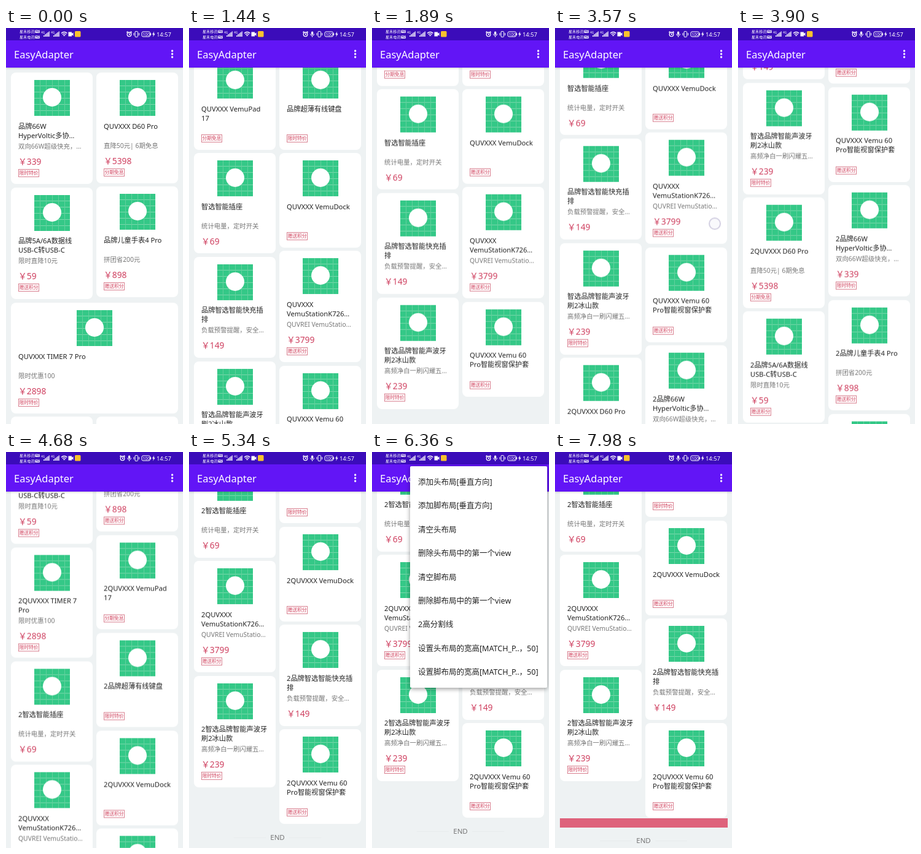
These frames come from a looping animation (288 by 640 pixels, 8000 ms). An HTML page:

```html
<!DOCTYPE html>
<html lang="zh">
<head>
<meta charset="utf-8">
<style>
html, body { margin: 0; width: 100%; height: 100%; overflow: hidden; }
body { font-family: "Noto Sans", "Noto Sans CJK SC", "Noto Sans CJK", sans-serif; }
div { position: absolute; box-sizing: border-box; white-space: pre; }
#stage { left: 0; top: 0; width: 288px; height: 640px; overflow: hidden; background: #eef2f3; }
#view { left: 0; top: 64px; width: 288px; height: 576px; overflow: hidden; }
#list { left: 0; top: -64px; width: 288px; height: 2600px; will-change: transform; }
#more { left: 0; top: 0; width: 288px; height: 2600px; }
.card { background: #fff; border-radius: 8px; }
.tile {
  top: 12px; left: calc(50% - 29px); width: 58px; height: 58px;
  background:
    repeating-linear-gradient(90deg, #0000 0 9px, #62d09d 9px 10px),
    repeating-linear-gradient(#0000 0 9px, #7bd9ad 9px 10px), #34c887;
}
.dot { left: 14px; top: 13px; width: 30px; height: 30px; border-radius: 50%; background: #fff; }
.title, .sub, .price { left: 12px; }
.title { font-size: 11.2px; line-height: 15px; color: #222; }
.sub { font-size: 10.4px; line-height: 15px; color: #777; }
.price { font-size: 13.8px; line-height: 20px; color: #cf3f5f; }
.tag {
  left: 12px; width: 34px; height: 13px; border: 1px solid #d98090;
  font-size: 7.8px; line-height: 11px; text-align: center; color: #d0405c;
}
#end { left: 0; top: 2467px; width: 288px; text-align: center; font-size: 11.5px; line-height: 18px; color: #777; }
#end i { position: absolute; top: 9px; width: 52px; height: 1px; background: #e8eced; }
#strip { left: 8px; top: 2455px; width: 273px; height: 15px; background: #de627b; }
#bar { left: 0; top: 20px; width: 288px; height: 44px; background: #6215f6; box-shadow: 0 1px 3px #0003; }
#name { left: 13px; top: 11px; font-size: 16.5px; line-height: 24px; color: #fff; }
#status { position: absolute; left: 0; top: 0; background: #3b0cba; }
#menu {
  left: 62px; top: 23px; width: 223px; height: 358px; background: #fff; border-radius: 2px;
  box-shadow: 0 2px 7px #0006; transform-origin: 100% 0;
}
#menu div { left: 13px; font-size: 12.5px; line-height: 20px; color: #222; }
#touch {
  left: 250px; top: 307px; width: 20px; height: 20px; border-radius: 50%;
  border: 2px solid #d3d0e2; background: #f7f6fbb0;
}
</style>
</head>
<body>
<div id="stage">
  <div id="view">
    <div id="list">
      <div id="more"></div>
      <div id="strip"></div>
      <div id="end"><i style="left:73px"></i>END<i style="left:163px"></i></div>
    </div>
  </div>
  <div id="bar"><div id="name">EasyAdapter</div></div>
  <svg id="status" width="288" height="20" fill="#fff" font-family="Noto Sans, Noto Sans CJK SC, sans-serif">
    <g font-size="6.1">
      <text x="22" y="8">星禾移讯</text><text x="22" y="17">星禾电讯</text>
    </g>
    <rect x="47" y="3" width="8" height="5" rx="1.5"/><rect x="47" y="12" width="8" height="5" rx="1.5"/>
    <g fill="#3b0cba" font-size="4.6" font-weight="700"><text x="47.8" y="7.2">HD</text><text x="47.8" y="16.2">HD</text></g>
    <g id="signal">
      <text x="57" y="9" font-size="5">4G</text>
      <path d="M61 14v-2h1.4v2zM63.2 14v-4h1.4v4zM65.4 14v-5.5h1.4V14zM67.6 14V7H69v7zM69.6 14V5.5h1.2V14z"/>
    </g>
    <use href="#signal" x="16"/>
    <path d="M90 8.5q4.7-4 9.4 0M91.7 10.6q3-2.5 6 0M93.3 12.5q1.4-1 2.8 0" fill="none" stroke="#fff" stroke-width="1.3"/>
    <path d="M101.5 6.5h5.5v7h-5.5zM107 9l2.5-1.8v5.6L107 11z"/>
    <rect x="112" y="5" width="9.5" height="9.5" rx="1.5" fill="#f9c22d"/>
    <g id="alarm" fill="none" stroke="#fff" stroke-width="1.3">
      <circle cx="189.5" cy="10.3" r="3.3"/><path d="M189.5 8.5v2h1.5M185.3 7.3l2-1.8M193.7 7.3l-2-1.8"/>
    </g>
    <g id="mic">
      <rect x="199" y="5.5" width="3.2" height="5.5" rx="1.6"/>
      <path d="M197.5 9.5q.2 3 3.1 3t3.1-3M200.6 12.5v2.3" fill="none" stroke="#fff"/>
    </g>
    <g fill="none" stroke="#fff">
      <rect x="210" y="5.5" width="4.5" height="9" rx="1"/>
      <path d="M208 8v4M216.5 8v4"/>
      <rect x="221" y="6" width="13.5" height="8" rx="2"/><path d="M235.7 8.5v3"/>
    </g>
    <text x="222.6" y="12.6" font-size="6.6">100</text>
    <path d="M241 5.5l-3 5h2l-.8 4 3.3-5.3h-2z"/>
    <text x="245" y="13.6" font-size="9.3">14:57</text>
  </svg>
  <svg style="position:absolute;left:264px;top:34px" width="14" height="16" fill="#fff">
    <circle cx="6.5" cy="3" r="1.7"/><circle cx="6.5" cy="8" r="1.7"/><circle cx="6.5" cy="13" r="1.7"/>
  </svg>
  <div id="touch"></div>
  <div id="menu"></div>
</div>
<script>
const $ = id => document.getElementById(id);
const LOOP = 8000, GAP = 5.5;
const SALE = '限时特价', SPLIT = '分期免息', GIFT = '赠送积分';

// title, subtitle, price, tag, card height
const goods = {
  charger: ['品牌66W\nHyperVoltic多协…', '双向66W超级快充，…', 339, SALE, 180],
  phone: ['QUVXXX D60 Pro', '直降50元| 6期免息', 5398, SPLIT, 178.5],
  cable: ['品牌5A/6A数据线\nUSB-C转USB-C', '限时直降10元', 59, GIFT, 180],
  kids: ['品牌儿童手表4 Pro', '拼团省200元', 898, GIFT, 178.5],
  watch: ['QUVXXX TIMER 7\nPro', '限时优惠100', 2898, SALE, 178.5],
  pad: ['QUVXXX VemuPad\n17', '', 0, SPLIT, 152.7],
  keys: ['品牌超薄有线键盘', '', 0, SALE, 152.7],
  plug: ['智选智能插座', '统计电量，定时开关', 69, '', 162],
  dock: ['QUVXXX VemuDock', '', 0, GIFT, 152.7],
  station: ['QUVXXX\nVemuStationK726…', 'QUVREI VemuStatio…', 3799, GIFT, 180],
  sockets: ['品牌智选智能快充插\n排', '负载预警提醒，安全…', 149, '', 163.5],
  brush: ['智选品牌智能声波牙\n刷2冰山款', '高频净白一刷闪耀五…', 239, SALE, 180],
  cover: ['QUVXXX Vemu 60\nPro智能视窗保护套', '', 0, GIFT, 152.7],
};

function add(parent, cls, top, text = '') {
  const el = document.createElement('div');
  el.className = cls;
  if (top != null) el.style.top = top + 'px';
  el.textContent = text;
  parent.append(el);
  return el;
}

function addCard(parent, key, x, y, width, prefix) {
  const [title, sub, price, tag, height] = goods[key];
  const wide = width > 200;
  const shift = title.includes('\n') && !wide ? 1 : 0;
  const card = add(parent, 'card', y);
  Object.assign(card.style, { left: x + 'px', width: width + 'px', height: height + 'px' });
  add(add(card, 'tile'), 'dot');
  add(card, 'title', 78.5, prefix + (wide ? title.replace('\n', ' ') : title));
  add(card, 'sub', 110.5 + shift, sub);
  if (price) add(card, 'price', 132.5 + shift, '￥' + price);
  if (tag) add(card, 'tag', price ? 154.5 + shift : 128, tag);
  return y + height + GAP;
}

function addColumn(parent, x, y, keys, prefix = '') {
  for (const key of keys.split(' ')) y = addCard(parent, key, x, y, 133, prefix);
  return y;
}

const list = $('list'), more = $('more');
addColumn(list, 8, 72, 'charger cable');
addColumn(list, 147, 72, 'phone kids');
addCard(list, 'watch', 8, 444, 272, '');
const left = addColumn(list, 8, 628, 'pad plug sockets brush');
const right = addColumn(list, 147, 628, 'keys dock station cover');
addColumn(more, 8, left, 'phone cable watch plug station brush', '2');
addColumn(more, 147, right, 'charger kids pad keys dock sockets cover', '2');

[
  '添加头布局[垂直方向]', '添加脚布局[垂直方向]', '清空头布局', '删除头布局中的第一个view',
  '清空脚布局', '删除脚布局中的第一个view', '2高分割线',
  '设置头布局的宽高[MATCH_P..，50]', '设置脚布局的宽高[MATCH_P..，50]',
].forEach((label, i) => add($('menu'), '', 16 + 38.4 * i, label));

// steps: [time, value, easing to the next step]
function play(el, prop, steps, show = v => v) {
  const all = [[0, steps[0][1]], ...steps, [LOOP, steps.at(-1)[1]]];
  el.animate(
    all.map(([t, v, easing = 'linear']) => ({ offset: t / LOOP, [prop]: show(v), easing })),
    { duration: LOOP, iterations: Infinity }
  );
}
const moveY = v => `translateY(${v}px)`;
const cut = 'step-end';

play(list, 'transform', [
  [30, 0, 'cubic-bezier(.3,.2,.5,1)'], [720, 330], [840, 330, 'cubic-bezier(.3,.3,.6,.92)'],
  [1890, 687, 'ease-out'], [2040, 712],
  [3390, 712, 'cubic-bezier(.5,.1,.8,.7)'], [3570, 774.5], [4230, 1292.5],
  [4680, 1523, 'cubic-bezier(.3,.4,.6,1)'], [5460, 1863],
], v => moveY(-v));
play(more, 'opacity', [[0, 0, cut], [2700, 1]]);
play($('alarm'), 'transform', [[0, 11, cut], [400, 0]], v => `translateX(${v}px)`);
play($('mic'), 'opacity', [[0, 0, cut], [400, 1]]);
play($('touch'), 'opacity', [[0, 0, cut], [3390, 1, cut], [3690, 0]]);
play($('touch'), 'transform', [[3390, 62], [3570, 0], [3690, -94]], moveY);
play($('menu'), 'opacity', [[5850, 0], [6000, 1], [7260, 1], [7450, 0]]);
play($('menu'), 'transform', [[5850, .4, 'ease-out'], [6150, 1]], v => `scale(${.5 + v / 2}, ${v})`);
play($('end'), 'transform', [[7480, 0, 'ease-in-out'], [7730, 15]], moveY);
play($('strip'), 'opacity', [[7700, 0], [7950, 1]]);
</script>
</body>
</html>
```
